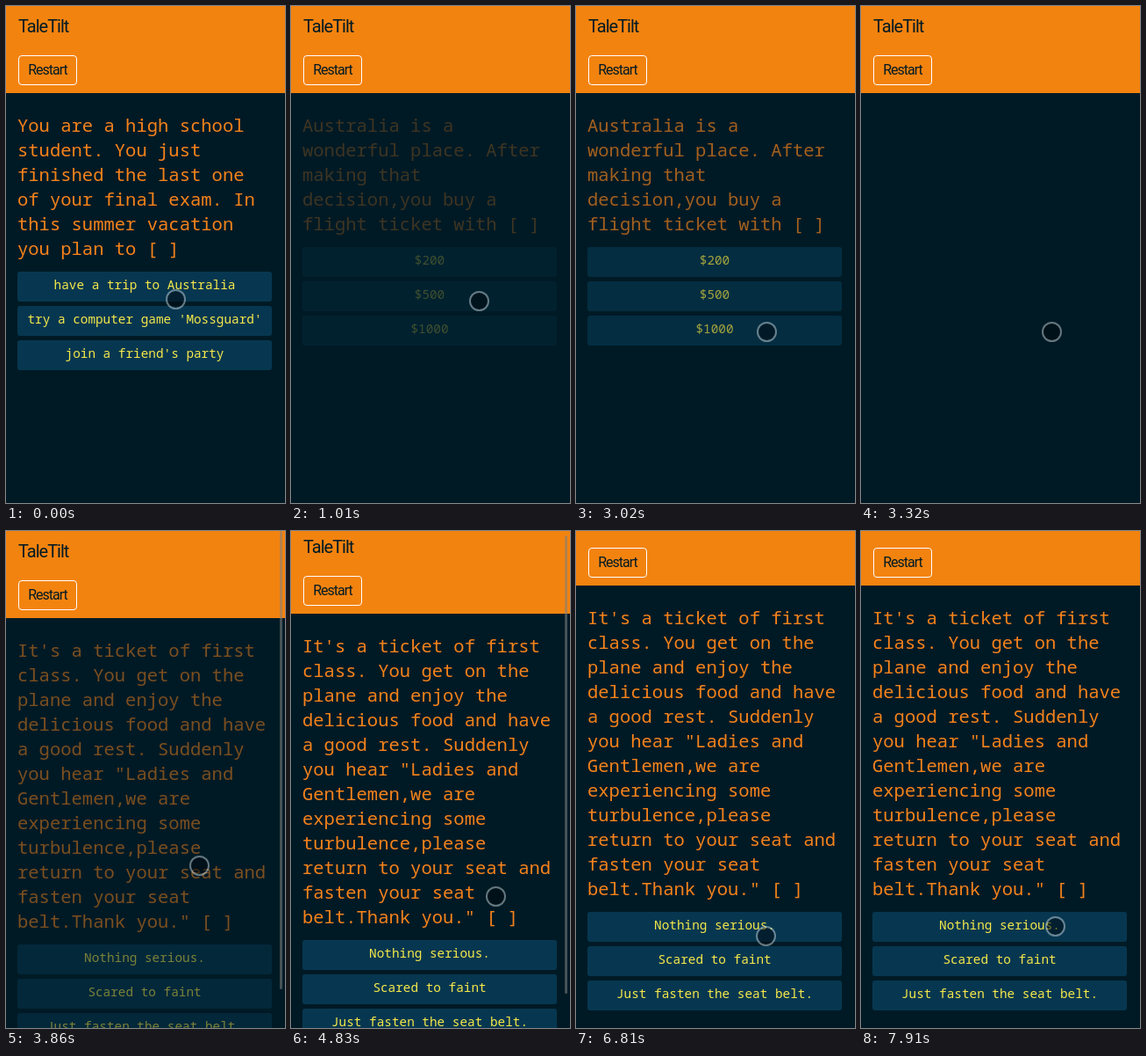
An HTML page that plays this animation: 318x565 px, repeating every 8000 ms.

```html
<!DOCTYPE html>
<html lang="en">
<head>
<meta charset="utf-8">
<title>TaleTilt</title>
<style>
  html, body { margin: 0; width: 100%; height: 100%; overflow: hidden; background: #001a25; }
  #stage { position: relative; width: 318px; height: 565px; overflow: hidden; }
  header { position: relative; height: 99px; background: #f3830f; color: #001a25;
    font-family: Roboto, "Open Sans", sans-serif; letter-spacing: -1px; }
  h1 { position: absolute; left: 14px; top: 9px; margin: 0; font-size: 20px; font-weight: 400; line-height: 28px; }
  .restart { position: absolute; left: 14px; top: 56px; width: 67px; height: 34px; box-sizing: border-box;
    border: 1px solid #fff; border-radius: 4px; font-size: 16px; line-height: 32px; text-align: center; }
  .page { position: absolute; left: 13px; top: 121px; width: 290px;
    font-family: "Noto Sans Mono", "DejaVu Sans Mono", monospace; font-weight: 500; }
  .story { margin: 0 0 13px; color: #f5821b; font: inherit; font-size: 20.53px; line-height: 28px; }
  .choice { height: 34px; margin-bottom: 5px; border-radius: 3px; background: #073750; color: #f6e94a;
    font-size: 14.37px; line-height: 30px; text-align: center; white-space: pre; }
  #thumb { position: absolute; left: 312px; top: 0; width: 3px; height: 521px; border-radius: 2px;
    background: rgba(128, 128, 128, .55); }
  #cursor { position: absolute; left: -11px; top: -11px; width: 23px; height: 23px; box-sizing: border-box;
    border: 2px solid rgba(200, 212, 218, .5); border-radius: 50%; background: rgba(0, 8, 14, .5);
    background-clip: padding-box; }
</style>
</head>
<body>
<div id="stage">
  <div id="scroller">
    <header><h1>TaleTilt</h1><div class="restart">Restart</div></header>
    <section class="page">
<pre class="story">You are a high school
student. You just
finished the last one
of your final exam. In
this summer vacation
you plan to [ ]</pre>
      <div class="choice">have a trip to Australia</div>
      <div class="choice">try a computer game 'Mossguard'</div>
      <div class="choice">join a friend's party</div>
    </section>
    <section class="page">
<pre class="story">Australia is a
wonderful place. After
making that
decision,you buy a
flight ticket with [ ]</pre>
      <div class="choice">$200</div>
      <div class="choice">$500</div>
      <div class="choice">$1000</div>
    </section>
    <section class="page">
<pre class="story">It's a ticket of first
class. You get on the
plane and enjoy the
delicious food and have
a good rest. Suddenly
you hear "Ladies and
Gentlemen,we are
experiencing some
turbulence,please
return to your seat and
fasten your seat
belt.Thank you." [ ]</pre>
      <div class="choice">Nothing serious.</div>
      <div class="choice">Scared to faint</div>
      <div class="choice">Just fasten the seat belt.</div>
    </section>
  </div>
  <div id="thumb"></div>
  <div id="cursor"></div>
</div>
<script>
const LOOP = 8000, STEP = 145, FADE_IN = 440, FADE_OUT = 300, SCROLL = 37;
const $ = id => document.getElementById(id);
const pages = [...document.querySelectorAll('.page')];
const shown = [
  { from: -FADE_IN, to: 540 },
  { from: 1000, to: 3020 },
  { from: 3590, to: LOOP }
];

// Each glide carries the cursor on to (x, y); sag bends its path downwards.
const glides = [
  { start: 120, end: 270, x: 196, y: 321 },
  { start: 540, end: 1440, x: 227, y: 325, sag: 12 },
  { start: 1720, end: 2020, x: 217, y: 370 },
  { start: 3590, end: 4560, x: 229, y: 411 },
  { start: 4830, end: 5410, x: 248, y: 431 },
  { start: 5970, end: 6940, x: 211, y: 464 },
  { start: 7090, end: 7640, x: 219, y: 444 },
  { start: 7910, end: 8055, x: 223, y: 454 }
];

// Progress from 0 to 1 in even steps, the first one taken at the start itself.
function progress(t, start, end) {
  if (t < start) return 0;
  if (t >= end) return 1;
  const steps = Math.round((end - start) / STEP);
  return (Math.floor((t - start) / (end - start) * steps) + 1) / (steps + 1);
}

const fadeIn = (t, start) => progress(t, start, start + FADE_IN);
const fadeOut = (t, start) => 1 - progress(t, start, start + FADE_OUT);
const flash = (t, from, to) => t < from ? 0 : fadeOut(t, to);

function cursorAt(t) {
  let x = 193, y = 333;
  for (const { start, end, x: toX, y: toY, sag = 0 } of glides) {
    const p = progress(t, start, end);
    x += (toX - x) * p;
    y += (toY - y) * p + sag * Math.sin(Math.PI * p);
  }
  return [x, y];
}

function draw() {
  const t = performance.now() % LOOP;
  const scroll = Math.round(SCROLL * progress(t, 4830, 5410) ** 1.25);
  const [x, y] = cursorAt(t).map(Math.round);

  pages.forEach((page, i) => {
    page.style.opacity = Math.min(fadeIn(t, shown[i].from), fadeOut(t, shown[i].to));
  });
  $('scroller').style.transform = `translateY(${-scroll}px)`;
  $('thumb').style.transform = `translateY(${Math.round(scroll * .94)}px)`;
  $('thumb').style.opacity = Math.max(flash(t, 3590, 4000), flash(t, 4830, 6110));
  $('cursor').style.transform = `translate(${x}px, ${y}px)`;
  requestAnimationFrame(draw);
}
draw();
</script>
</body>
</html>
```
